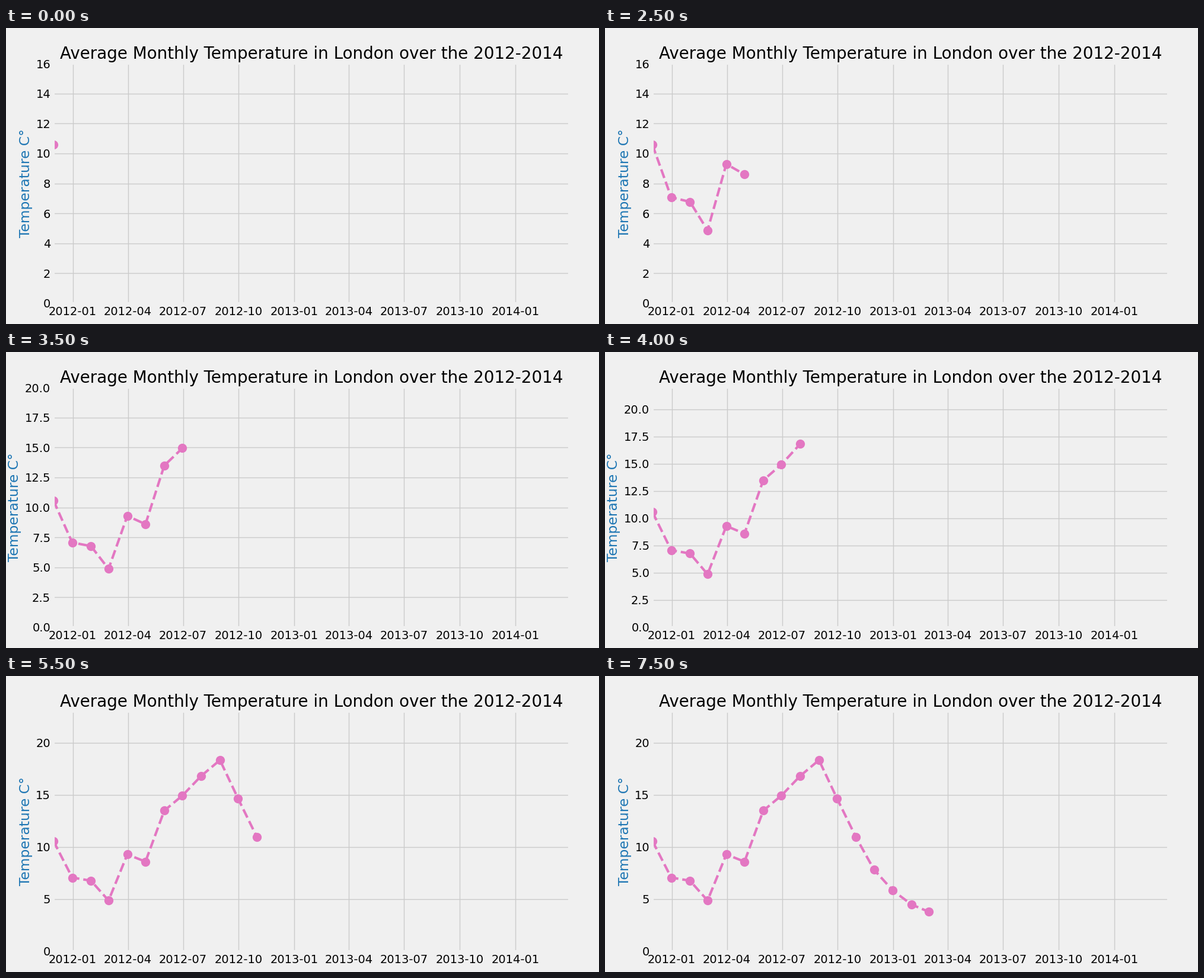
These frames come from a looping animation (1000x500 px, 8000 ms). A matplotlib script:

```python
import matplotlib.pyplot as plt
import numpy as np
from matplotlib.animation import FuncAnimation

plt.style.use("fivethirtyeight")
plt.rcParams["font.family"] = "DejaVu Sans"

TEMPS = [10.58, 7.07, 6.77, 4.87, 9.29, 8.6, 13.49, 14.94,
         16.82, 18.34, 14.64, 10.96, 7.82, 5.83, 4.48, 3.8]
STEP_MS = 500

# Last day of each month, from November 2011 to March 2014
months = np.arange("2011-12", "2014-05", dtype="datetime64[M]")
days = months.astype("datetime64[D]") - 1

fig, ax = plt.subplots(figsize=(10, 5), dpi=100)
line, = ax.plot(days[:1], TEMPS[:1], color="tab:pink", linestyle="--",
                linewidth=3, marker="o", markersize=10)
ax.set_xlim(days[0], days[-1])
ax.set_title("Average Monthly Temperature in London over the 2012-2014",
             fontsize=20)
ax.set_ylabel("Temperature C°", color="tab:blue")


def update(frame):
    shown = TEMPS[:frame + 1]
    line.set_data(days[:frame + 1], shown)
    ax.set_ylim(0, round(max(shown)) + 5)
    return line,


anim = FuncAnimation(fig, update, frames=len(TEMPS), interval=STEP_MS,
                     repeat=True)
plt.show()
```
